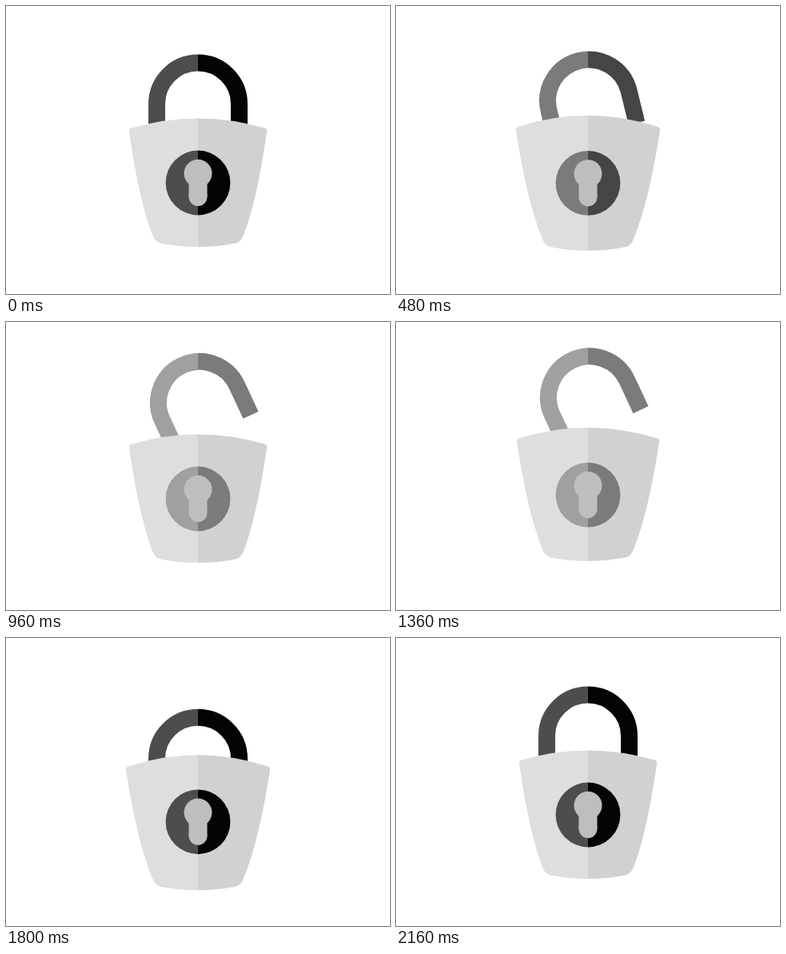
Animation, 480 px wide and 360 px high, one loop 2320 ms. Source, as an HTML page with a canvas:

```html
<!DOCTYPE html>
<html lang="en">
<head>
<meta charset="utf-8">
<title>Padlock</title>
<style>
  html, body { margin: 0; width: 100%; height: 100%; overflow: hidden; background: #fff; }
  canvas { display: block; }
</style>
</head>
<body>
<canvas id="stage" width="480" height="360"></canvas>
<script>
const ctx = document.getElementById('stage').getContext('2d');
const LOOP = 2320, STEP = 40, CX = 240;

// half: body half width, rim: upper corner, top/base: body extent,
// hole: keyhole centre, arc: shackle centre, open: 0 locked .. 1 unlocked
const locked   = { half: 86.2, rim: 153.3, top: 140.4, base: 301,   hole: 221,   arc: 122.5, open: 0 };
const squashed = { half: 90.2, rim: 161.3, top: 146.3, base: 315.3, hole: 229.8, arc: 150.8, open: 0 };
const raised   = { half: 90.2, rim: 143.8, top: 129,   base: 297.8, hole: 214.5, arc: 92.1,  open: 1 };
const unlocked = { ...locked, arc: 101, open: 1 };

const keys = [
  [0, locked], [320, squashed], [620, raised], [640, raised], [960, unlocked],
  [1200, unlocked], [1440, raised], [1800, squashed], [2160, locked], [LOOP, locked]
];

const mix = (a, b, u) => a + (b - a) * u;
const ease = u => u * u * (3 - 2 * u);
const grey = v => `rgb(${v},${v},${v})`;

function poseAt(t) {
  const i = keys.findIndex(k => k[0] > t);
  const [t0, a] = keys[i - 1], [t1, b] = keys[i];
  const u = ease((t - t0) / (t1 - t0));
  return Object.fromEntries(Object.keys(a).map(k => [k, mix(a[k], b[k], u)]));
}

function shackle(p, color) {
  ctx.save();
  ctx.translate(CX + 2 * p.open, p.arc);
  ctx.rotate(-25 * Math.PI / 180 * p.open);
  ctx.beginPath();
  ctx.moveTo(-51.5, 41);
  ctx.lineTo(-51.5, 0);
  ctx.arc(0, 0, 51.5, Math.PI, 0);
  ctx.lineTo(51.5, 41);
  ctx.lineWidth = 21;
  ctx.strokeStyle = color;
  ctx.stroke();
  ctx.restore();
}

function body(p, color) {
  const { half: w, rim, top, base } = p;
  const low = base - 4.5;
  ctx.save();
  ctx.translate(CX, 0);
  ctx.beginPath();
  ctx.moveTo(3 - w, rim - 0.7);
  ctx.quadraticCurveTo(0, 2 * top - rim + 0.7, w - 3, rim - 0.7);
  ctx.quadraticCurveTo(w + 0.3, rim, w - 0.2, rim + 4);
  ctx.quadraticCurveTo(mix(w, 57, 0.42), mix(rim, base, 0.6), 57.5, base - 16);
  ctx.quadraticCurveTo(54.5, low - 2, 47, low);
  ctx.quadraticCurveTo(0, 2 * base - low, -47, low);
  ctx.quadraticCurveTo(-54.5, low - 2, -57.5, base - 16);
  ctx.quadraticCurveTo(-mix(w, 57, 0.42), mix(rim, base, 0.6), 0.2 - w, rim + 4);
  ctx.quadraticCurveTo(-w - 0.3, rim, 3 - w, rim - 0.7);
  ctx.fillStyle = color;
  ctx.fill();
  ctx.restore();
}

function disc(y, r) {
  ctx.beginPath();
  ctx.arc(CX, y, r, 0, 7);
  ctx.fill();
}

function keyhole(y) {
  ctx.fillStyle = grey(190);
  disc(y - 11.7, 17.5);
  disc(y + 17.5, 11.5);
  ctx.fillRect(CX - 11.5, y - 11.7, 23, 29.2);
}

function side(p, x, dark, light, shell) {
  const metal = grey(Math.round(mix(dark, light, p.open)));
  ctx.save();
  ctx.beginPath();
  ctx.rect(x, 0, CX, 360);
  ctx.clip();
  shackle(p, metal);
  body(p, grey(shell));
  ctx.fillStyle = metal;
  disc(p.hole, 40.4);
  ctx.restore();
}

const start = performance.now();

function draw() {
  const t = (performance.now() - start) % LOOP;
  const p = poseAt(Math.floor(t / STEP) * STEP);
  ctx.fillStyle = '#fff';
  ctx.fillRect(0, 0, 480, 360);
  side(p, 0, 77, 160, 222);
  side(p, CX, 4, 123, 209);
  keyhole(p.hole);
  requestAnimationFrame(draw);
}
draw();
</script>
</body>
</html>
```
